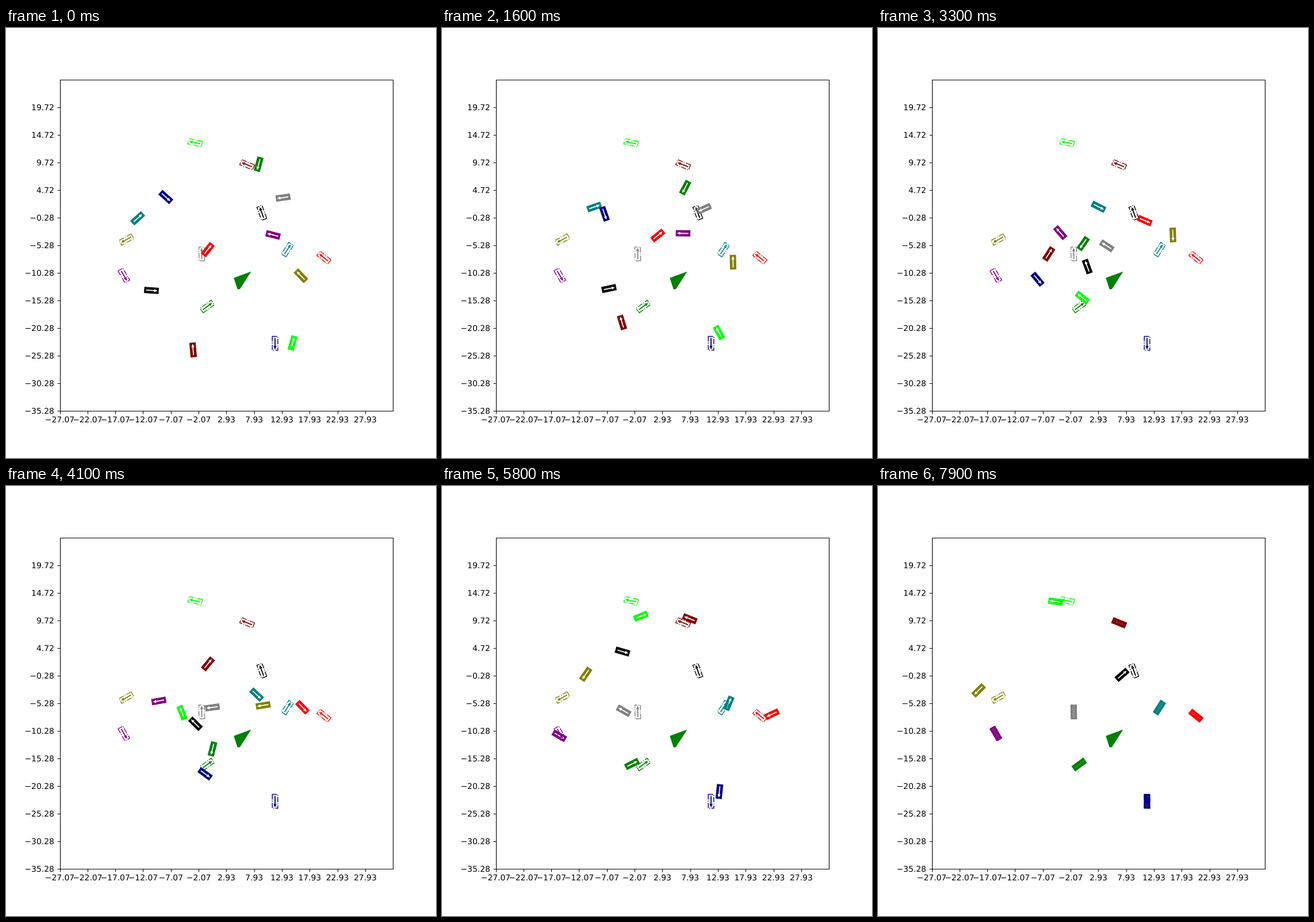
Recreate the animation shown at these times as an HTML page. Size 748 by 748 pixels, loop 8 s.

```html
<!DOCTYPE html>
<html lang="en">
<head>
<meta charset="utf-8">
<title>Vehicles driving to their goals</title>
<style>
  html, body { margin: 0; width: 100%; height: 100%; overflow: hidden; background: #fff; }
  svg { display: block; width: 100%; height: 100%; }
  text { font: 13.89px "DejaVu Sans", sans-serif; text-rendering: geometricPrecision; }
</style>
</head>
<body>
<svg id="stage" viewBox="0 0 748 748"></svg>
<script>
const stage = document.getElementById('stage');
const LOOP = 8000, STEP = 100, LAST = 78;
const KEYS = [0, 32, 47, 57, 65, LAST]; // steps of the given poses
const START = 1.7;                      // exponent of the start from rest
const RAD = Math.PI / 180;
const BOX = 'M-12 4.8H12V-4.8H-12Z';
const ARROW = 'M-8.5-.2H5.5V-1.6L9 0L5.5 1.6V.2H-8.5Z';

function add(parent, tag, attrs, text) {
  const el = document.createElementNS('http://www.w3.org/2000/svg', tag);
  for (const k in attrs) el.setAttribute(k, attrs[k]);
  if (text) el.textContent = text;
  parent.appendChild(el);
  return el;
}

const clamp = (v, lo, hi) => Math.min(hi, Math.max(lo, v));
const place = (el, x, y, a) =>
  el.setAttribute('transform', `translate(${x.toFixed(2)} ${y.toFixed(2)}) rotate(${a.toFixed(2)})`);

function drawAxes() {
  const left = 93.5, bottom = 665.72, dx = 48.308, dy = 47.996;
  const snap = v => Math.floor(v + .5) + .5;
  const label = v => v.toFixed(2).replace('-', '\u2212');
  for (let i = 0; i < 12; i++) {
    const x = left + dx * i, y = bottom - dy * i;
    add(stage, 'path', { d: `M${snap(x)} 666.5v4.9M94.5 ${snap(y)}h-4.9`, stroke: '#000', 'stroke-width': 1.1 });
    add(stage, 'text', { x, y: 686, 'text-anchor': 'middle' }, label(-27.07 + 5 * i));
    add(stage, 'text', { x: 83.8, y: Math.round(y) + 5, 'text-anchor': 'end' }, label(-35.28 + 5 * i));
  }
  add(stage, 'path', { d: 'M94.5 90.5H673.5V666.5H94.5Z', fill: 'none', stroke: '#000', 'stroke-width': 1.1 });
}

const cars = [];

// Poses are [x, y, heading]. A car without a full set of poses parks on its goal.
function car(color, goal, ...poses) {
  const body = add(stage, 'g');
  add(body, 'path', { d: BOX, fill: color, stroke: color, 'stroke-width': 1.39 });
  add(body, 'path', { d: ARROW, fill: '#fff', stroke: '#fff', 'stroke-width': 1.39 });

  const mark = add(stage, 'g', { stroke: color, 'stroke-width': 1.39 });
  add(mark, 'path', { d: BOX, fill: 'none', 'stroke-dasharray': '8.9 2.2 1.4 2.2' });
  add(mark, 'path', { d: ARROW, fill: color });
  place(mark, ...goal);

  if (poses.length < KEYS.length) poses.push(goal);
  const end = poses.length - 1;
  const pts = poses.map(([x, y, a], i) =>
    ({ x, y, a, t: i === end ? LAST : KEYS[i], cx: Math.cos(a * RAD), cy: Math.sin(a * RAD) }));

  const legs = pts.slice(1).map((q, i) => {
    const p = pts[i], power = i ? 1 : START;
    return { p, q, power, dur: (q.t - p.t) / power };
  });
  // Mean speed on a leg, measured along the heading of c
  const along = (c, { p, q, dur }) => ((q.x - p.x) * c.cx + (q.y - p.y) * c.cy) / dur;
  pts.forEach((c, i) => {
    if (i === end) { c.v = along(c, legs[i - 1]) / 2; return; }
    const w = along(c, legs[i]), u = i ? along(c, legs[i - 1]) : w;
    c.v = clamp(u * w > 0 ? (u + w) / 2 : Math.max(u, w), 3.5, 9);
  });
  cars.push({ body, legs });
}

drawAxes();
add(stage, 'path', { d: 'M396.8 435L425.5 424.5L406.5 454L403 454Z', fill: '#008000', stroke: '#008000' });

car('#000000', [445, 321.5, 250],
  [253, 456.5, 4], [364, 415, -110], [293, 405.5, -125], [314, 288, 16], [433, 315.5, 18], [424.5, 328.5, -41]);
car('#808080', [340.5, 393, 269], [482, 295, 172], [398, 379, 213], [324, 394, 190], [316, 391, 210]);
car('#ff0000', [553, 399.5, -141], [351, 385.5, -52], [464, 335, 23], [568, 430.5, 24], [574, 397, -205]);
car('#800000', [419.5, 238, -158], [325.5, 560, -95], [297, 393, -57], [399, 264, -1], [431, 231, -158]);
car('#008000', [350, 484.5, 324], [439.5, 237, 105], [357, 375, 125], [366, 513, 137], [330.5, 483.5, 333]);
car('#00ff00', [329, 199.5, 192],
  [498.5, 548, -74], [355.5, 469, -142], [295, 319, -78], [346, 226.5, -22], [343, 187, -195], [309, 201, -172]);
car('#808000', [209.5, 368, 151],
  [513, 431, 226], [513, 360, 448], [363, 376, 562], [250, 327.5, 484], [224, 393, 549], [175, 355.5, 495]);
car('#008080', [489.5, 385.5, -57], [229, 331, -42], [383.5, 311, 27], [474, 397, 8], [499, 378, -67]);
car('#000080', [468, 548.5, 90], [278, 294, 42], [277.5, 437, 50], [415, 534, 3], [482.5, 531.5, 96]);
car('#800080', [205, 430.5, 60], [464.5, 360, 194], [317, 356, 229], [216, 400, 171], [204, 434.5, 30]);

// Cubic path between poses; the heading leans towards the direction of travel
function pose(legs, s) {
  const { p, q, power, dur } = legs.find(leg => s <= leg.q.t);
  const u = ((s - p.t) / (q.t - p.t)) ** power;
  const axis = (a, b, m, n) => {
    const c = 3 * (b - a) - 2 * m - n, d = 2 * (a - b) + m + n;
    return [a + u * (m + u * (c + u * d)), (m + u * (2 * c + 3 * u * d)) / dur];
  };
  const [x, vx] = axis(p.x, q.x, p.v * p.cx * dur, q.v * q.cx * dur);
  const [y, vy] = axis(p.y, q.y, p.v * p.cy * dur, q.v * q.cy * dur);
  const a = p.a + (q.a - p.a) * u;
  const lean = Math.sin(2 * (Math.atan2(vy, vx) - a * RAD)) / 2 / RAD;
  return [x, y, a + lean * Math.min(1, Math.hypot(vx, vy)) * Math.min(1, 8 * u * (1 - u))];
}

function draw(ms) {
  const s = clamp(Math.floor(ms / STEP) - 1, 0, LAST);
  for (const { body, legs } of cars) place(body, ...pose(legs, s));
}

const start = performance.now();
function tick() {
  draw((performance.now() - start) % LOOP);
  requestAnimationFrame(tick);
}
tick();
</script>
</body>
</html>
```
